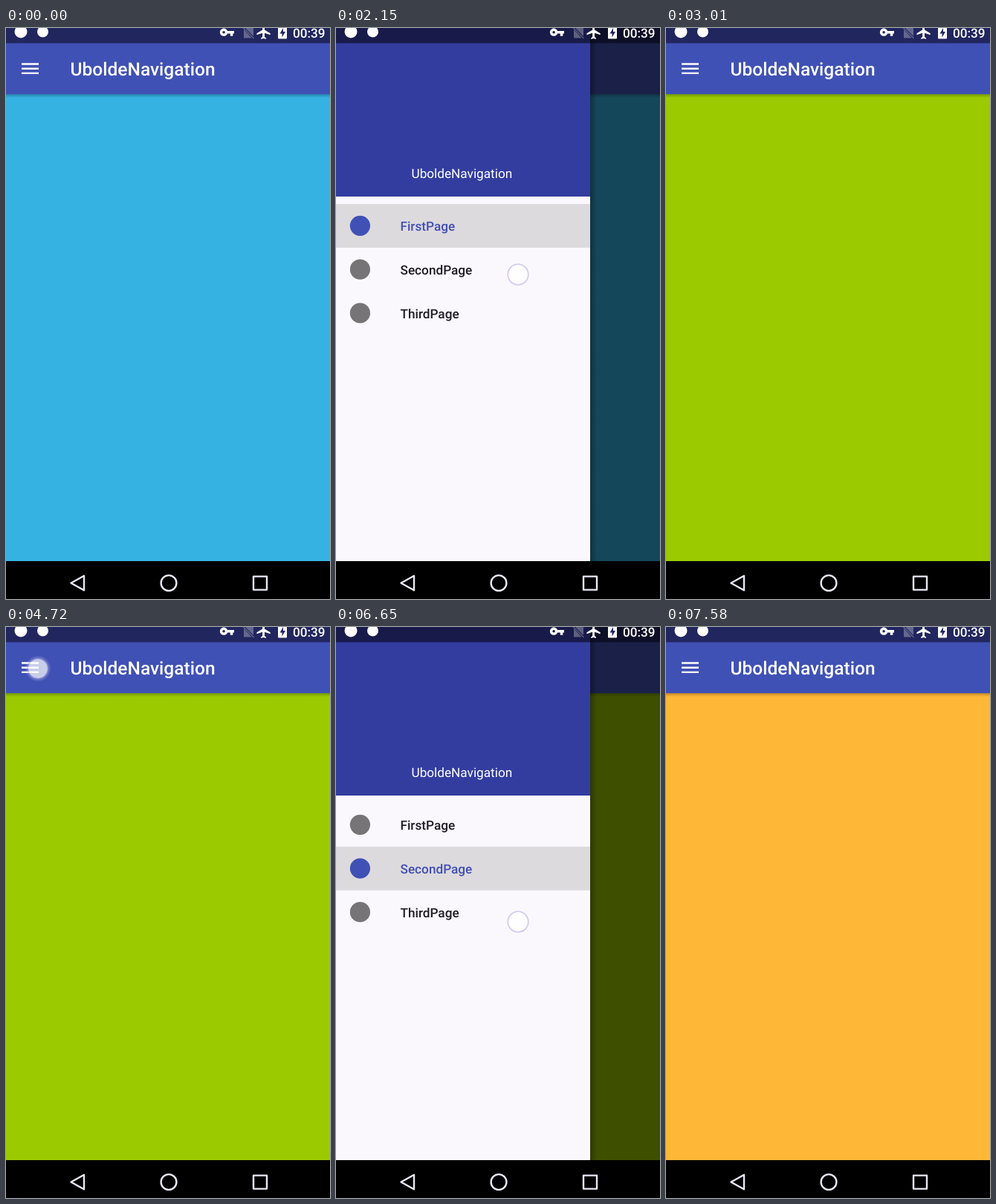
Recreate the animation shown at these times as an HTML page. Size 436x769 px, loop 8000 ms.

```html
<!DOCTYPE html>
<html lang="en">
<head>
<meta charset="utf-8">
<title>Navigation drawer</title>
<style>
  html, body { margin: 0; width: 100%; height: 100%; overflow: hidden; background: #000; }
  svg { display: block; width: 100vw; height: 100vh; font-family: Roboto, sans-serif; }
  text { text-rendering: geometricPrecision; }
  .title { font-size: 24.5px; font-weight: 500; fill: #fff; }
  .item text { font-size: 17.2px; font-weight: 500; fill: #1e1c24; }
  .item circle { fill: #767476; }
  .item rect { fill: none; }
  .item.on text { fill: #414fb5; }
  .item.on circle { fill: #4051b5; }
  .item.on rect { fill: #dddade; }
</style>
</head>
<body>
<svg viewBox="0 0 436 769" preserveAspectRatio="none">
  <defs>
    <linearGradient id="down" x2="0" y2="1">
      <stop offset="0" stop-opacity=".25"/><stop offset="1" stop-opacity="0"/>
    </linearGradient>
    <linearGradient id="side">
      <stop offset="0" stop-opacity=".3"/><stop offset="1" stop-opacity="0"/>
    </linearGradient>
  </defs>

  <rect id="page" width="436" height="718"/>
  <rect id="nextPage" width="436" height="718"/>
  <rect y="89" width="436" height="5" fill="url(#down)"/>
  <rect width="436" height="89.1" fill="#4051b5"/>
  <rect width="436" height="20.5" fill="#21265f"/>
  <path id="burger" d="M21 48.5H44M21 54.7H44M21 60.9H44" stroke="#fff" stroke-width="2.4"/>
  <text class="title" x="86.5" y="64">UboldeNavigation</text>

  <rect id="scrim" width="436" height="718"/>

  <g id="drawer">
    <rect id="edge" x="342" width="9" height="718" fill="url(#side)"/>
    <rect width="342" height="718" fill="#fbf8fd"/>
    <rect width="342" height="227" fill="#333da0"/>
    <rect width="342" height="20.5" fill="#181b4a"/>
    <text x="101.5" y="202" font-size="17.2" fill="#fff">UboldeNavigation</text>
    <g id="items"></g>
  </g>

  <!-- status bar -->
  <g fill="#fff">
    <circle cx="20" cy="5" r="8.5"/>
    <circle cx="49.5" cy="5" r="7.5"/>
    <path transform="translate(287 -4.8) scale(.87)" d="M12.65 10C11.83 7.67 9.61 6 7 6c-3.31 0-6 2.69-6 6s2.69 6 6 6c2.61 0 4.83-1.67 5.65-4H17v4h4v-4h2v-4H12.65zM7 14c-1.1 0-2-.9-2-2s.9-2 2-2 2 .9 2 2-.9 2-2 2z"/>
    <g opacity=".3">
      <path d="M320 2V13.5H330.5ZM322 0H333V11Z"/>
      <path d="M318.5 -1L333.5 14" stroke="#fff" stroke-width="1.3"/>
    </g>
    <path transform="translate(335.5 -6.2) scale(.96)" d="M21 16v-2l-8-5V3.5c0-.83-.67-1.5-1.5-1.5S10 2.67 10 3.5V9l-8 5v2l8-2.5V19l-2 1.5V22l3.5-1 3.5 1v-1.5L13 19v-5.5l8 2.5z"/>
    <rect x="366" y="-2" width="12" height="16.5" rx="1"/>
    <path d="M373 0L368.5 7.5H371.5V12.5L376 5H373Z" fill="#21265f"/>
    <text x="386" y="12.5" font-size="17.2" font-weight="500">00:39</text>
  </g>

  <!-- system buttons -->
  <rect y="718" width="436" height="51"/>
  <g fill="none" stroke="#ebe9f5" stroke-width="2.4" stroke-linejoin="round">
    <path d="M87.5 747.5L105 737.8V757.2Z"/>
    <circle cx="219" cy="747.5" r="10.4"/>
    <rect x="333" y="738.6" width="18" height="18"/>
  </g>

  <g id="touch">
    <circle r="17" fill="#fff" opacity=".1"/>
    <circle r="13" fill="#fff" opacity=".68"/>
    <circle r="13.8" fill="none" stroke="#a9a2e4" stroke-width="1.8" opacity=".5"/>
  </g>
</svg>

<script>
  const LOOP = 8000, TICK = 80, SETTLE = 512, FADE = 220, WIDTH = 342;
  const colors = ['#35b1e2', '#9bca01', '#ffb737'];

  // Each burst of motion advances in ticks counted from its start.
  const bursts = [0, 280, 2000, 2850, 4720, 6650, 7350];
  const moves = [
    { at: 420, open: true },
    { at: 2158, open: false },
    { at: 4850, open: true },
    { at: 6760, open: false }
  ];
  const fades = [2790, 7290];
  const taps = [
    { at: 280, end: 420, x: 43, y: 56 },
    { at: 2000, end: 2158, x: 245, y: 332 },
    { at: 4720, end: 4850, x: 43, y: 56 },
    { at: 6650, end: 6760, x: 245, y: 397 }
  ];

  const el = id => document.getElementById(id);
  const set = (id, name, value) => el(id).setAttribute(name, value);
  const clamp = v => Math.min(1, Math.max(0, v));
  const settle = u => 1 - (1 - clamp(u)) ** 5;

  el('items').innerHTML = ['FirstPage', 'SecondPage', 'ThirdPage'].map((label, i) => `
    <g class="item" transform="translate(0 ${237 + i * 58.8})">
      <rect width="${WIDTH}" height="58.8"/>
      <circle cx="32.4" cy="29.3" r="13.6"/>
      <text x="86.5" y="36">${label}</text>
    </g>`).join('');
  const items = [...document.querySelectorAll('.item')];

  function drawerAt(t) {
    const move = moves.filter(m => t >= m.at).pop();
    if (!move) return { shown: 0, open: true };
    const p = settle((t - move.at) / SETTLE);
    return { shown: move.open ? p : 1 - p, open: move.open };
  }

  function render(time) {
    const start = bursts.filter(b => time >= b).pop();
    const t = start + Math.floor((time - start) / TICK) * TICK;

    const { shown, open } = drawerAt(t);
    set('drawer', 'transform', `translate(${(shown - 1) * WIDTH} 0)`);
    set('edge', 'opacity', clamp(shown * 40));
    set('scrim', 'opacity', shown * 0.6);
    set('burger', 'transform', `rotate(${(open ? 180 : -180) * shown} 32.5 54.7)`);

    const selected = moves.filter(m => !m.open && t >= m.at).length;
    items.forEach((item, i) => item.classList.toggle('on', i === selected));

    const done = fades.filter(f => t >= f + FADE).length;
    const mix = done < fades.length ? clamp((t - fades[done]) / FADE) : 0;
    set('page', 'fill', colors[done]);
    set('nextPage', 'fill', colors[Math.min(done + 1, 2)]);
    set('nextPage', 'opacity', mix);

    const tap = taps.find(p => t >= p.at && t < p.end);
    set('touch', 'visibility', tap ? 'visible' : 'hidden');
    if (tap) set('touch', 'transform', `translate(${tap.x} ${tap.y})`);
  }

  const begin = performance.now();
  function frame() {
    render((performance.now() - begin) % LOOP);
    requestAnimationFrame(frame);
  }
  frame();
</script>
</body>
</html>
```
